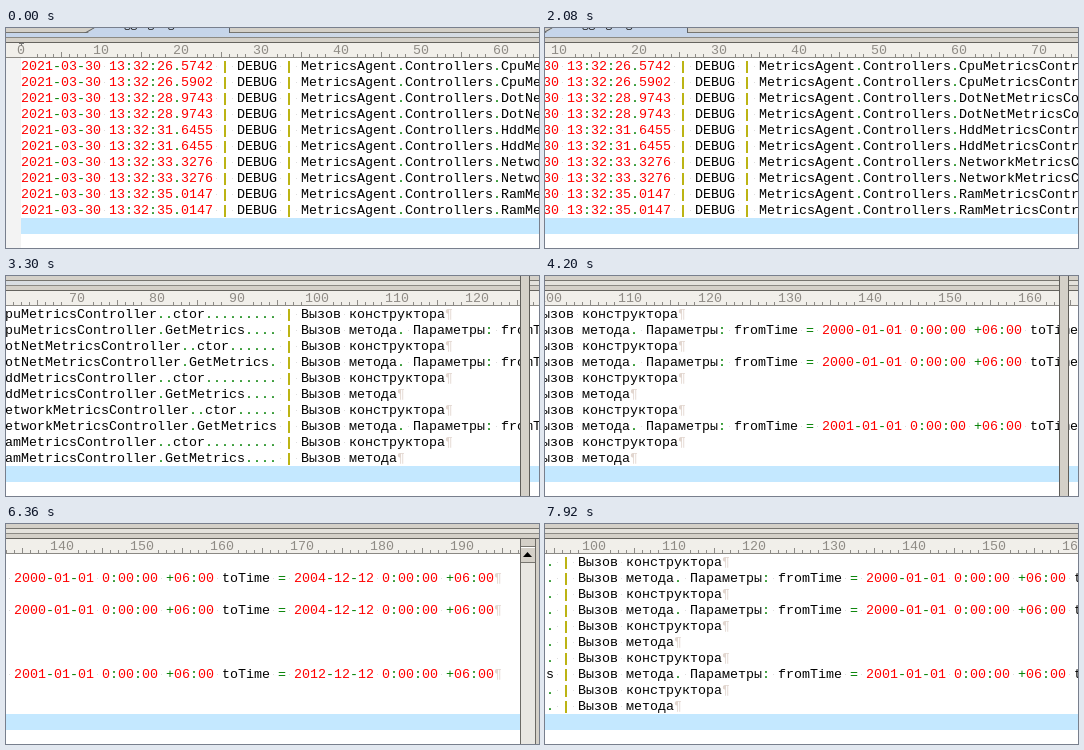
Recreate the animation shown at these times as an HTML page with a canvas. Size 533 by 220 pixels, loop 8000 ms.

```html
<!DOCTYPE html>
<html lang="ru">
<head>
<meta charset="utf-8">
<style>
html, body { margin: 0; width: 533px; height: 220px; overflow: hidden; }
canvas { display: block; }
</style>
</head>
<body>
<canvas id="stage" width="533" height="220"></canvas>
<script>
const ctx = document.getElementById('stage').getContext('2d');
const LEFT = 15, CELL = 8, ROW = 16, TOP = 30, RIGHT = 1593;

const times = ['26.5742', '26.5902', '28.9743', '28.9743', '31.6455',
  '31.6455', '33.3276', '33.3276', '35.0147', '35.0147'];
const names = ['Cpu', 'DotNet', 'Hdd', 'Network', 'Ram'];
// Years of the range that a method call received
const ranges = { 1: [2000, 2004], 3: [2000, 2004], 7: [2001, 2012] };

const lines = times.map((time, i) => {
  const method = i % 2 ? '.GetMetrics' : '..ctor';
  const place = `MetricsAgent.Controllers.${names[i >> 1]}MetricsController${method}`;
  let message = i % 2 ? 'Вызов метода' : 'Вызов конструктора';
  if (ranges[i]) {
    const [from, to] = ranges[i];
    message += `. Параметры: fromTime = ${from}-01-01 0:00:00 +06:00` +
      ` toTime = ${to}-12-12 0:00:00 +06:00`;
  }
  return `2021-03-30 13:32:${time} | DEBUG | ${place.padEnd(60, '.')} | ${message}¶`;
});

// time, offset, speed
const path = [
  [1310, 0, 0], [2080, 81, .21], [3300, 504, .35], [4200, 810, .34],
  [5030, 1079, .27], [5031, 1079, 0], [6330, 1079, 0], [7110, 1011, -.19], [7920, 766, -.34]
];

function offsetAt(t) {
  if (t <= path[0][0]) return 0;
  const next = path.findIndex(p => t < p[0]);
  if (next < 0) return path[path.length - 1][1];
  const [t0, x0, v0] = path[next - 1], [t1, x1, v1] = path[next];
  const d = t1 - t0, u = (t - t0) / d, w = 1 - u;
  return Math.round(w * w * ((1 + 2 * u) * x0 + u * d * v0) +
    u * u * ((3 - 2 * u) * x1 - w * d * v1));
}

function rect(color, x, y, w, h) {
  ctx.fillStyle = color;
  ctx.fillRect(x, y, w, h);
}

function shape(color, ...points) {
  ctx.fillStyle = color;
  ctx.beginPath();
  points.forEach(p => ctx.lineTo(...p));
  ctx.fill();
}

function drawHeader(shift) {
  rect('#d4d0c8', 0, 0, 533, 30);
  const blue = ctx.createLinearGradient(200 - shift, 0, 700 - shift, 0);
  blue.addColorStop(0, '#c6d5ea');
  blue.addColorStop(1, '#e4e2dc');
  rect(blue, 0, 5, 533, 4);
  rect('#77756f', 0, 4, 533, 1);
  shape('#606468', [78 - shift, 5], [87 - shift, 0], [89 - shift, 0], [80 - shift, 5]);
  shape('#c6d5ea', [80 - shift, 6], [89 - shift, 0], [223 - shift, 0], [223 - shift, 6]);
  rect('#606468', 223 - shift, 0, 1, 5);
  ctx.font = '12px "Open Sans", sans-serif';
  ctx.fillStyle = '#222';
  ctx.fillText('logging.log', 108 - shift, -1);
  rect('#8c8a84', 0, 9, 533, 1);
  rect('#65635e', 0, 14, 533, 1);
}

function drawRuler(shift) {
  rect('#f1efea', 0, 15, 533, 14);
  rect('#8b8984', 0, 29, 533, 1);
  ctx.font = '13.333px "Liberation Mono", monospace';
  ctx.textAlign = 'center';
  for (let col = 0; col < 198; col++) {
    const x = LEFT + col * CELL - shift;
    if (x < -20 || x > 553) continue;
    if (col % 10 === 0) {
      ctx.fillStyle = '#8f8b85';
      ctx.fillText(col, x, 26);
    } else if (col % 10 > 1 && col % 10 < 9) {
      const h = col % 5 ? 3 : 5;
      rect('#8d8b87', x, 29 - h, 1, h);
    }
  }
  rect('#777', LEFT - 2 - shift, 15, 5, 1);
  rect('#777', LEFT - shift, 16, 1, 2);
  ctx.textAlign = 'left';
}

function colorOf(ch) {
  if (ch === '¶') return '#e2d6cf';
  if (/\d/.test(ch)) return '#ff0000';
  return /[.:=+-]/.test(ch) ? '#008000' : '#000';
}

function drawLog(shift) {
  rect('#fff', 0, TOP, 533, 190);
  rect('#c4e8ff', 0, TOP + 10 * ROW, 533, ROW);
  rect('#f3f3f3', -shift, TOP, LEFT, 190);
  lines.forEach((line, row) => {
    const y = TOP + row * ROW;
    for (let col = 0; col < line.length; col++) {
      const x = LEFT + col * CELL - shift, ch = line[col];
      if (x < -CELL || x > 533) continue;
      if (ch === ' ') rect('#dedede', x + 3, y + 8, 1, 1);
      else if (ch === '|') rect('#bcb414', x + 3, y + 3, 2, 12);
      else {
        ctx.fillStyle = colorOf(ch);
        ctx.fillText(ch, x, y + 12);
      }
    }
  });
}

function drawScrollbar(x) {
  if (x > 533) return;
  rect('#d4d0c8', x, 15, 60, 205);
  rect('#e9e7e2', x + 1, 38, 14, 182);
  rect('#6c6a65', x, 15, 1, 205);
  rect('#6c6a65', x + 15, 15, 1, 205);
  rect('#fff', x + 1, 23, 14, 1);
  rect('#77756f', x + 1, 22, 14, 1);
  rect('#77756f', x + 1, 38, 14, 1);
  shape('#000', [x + 3, 33], [x + 7.5, 28], [x + 12, 33]);
}

function draw(now) {
  const t = now % 8000, shift = offsetAt(t);
  drawHeader(shift);
  drawRuler(shift);
  drawLog(shift);
  drawScrollbar(RIGHT - shift);
  if (t > 2600 && t < 4600) {
    rect('#5f5d59', 514, 0, 10, 220);
    rect('#d4d0c8', 515, 0, 8, 220);
  }
  requestAnimationFrame(draw);
}
requestAnimationFrame(draw);
</script>
</body>
</html>
```
